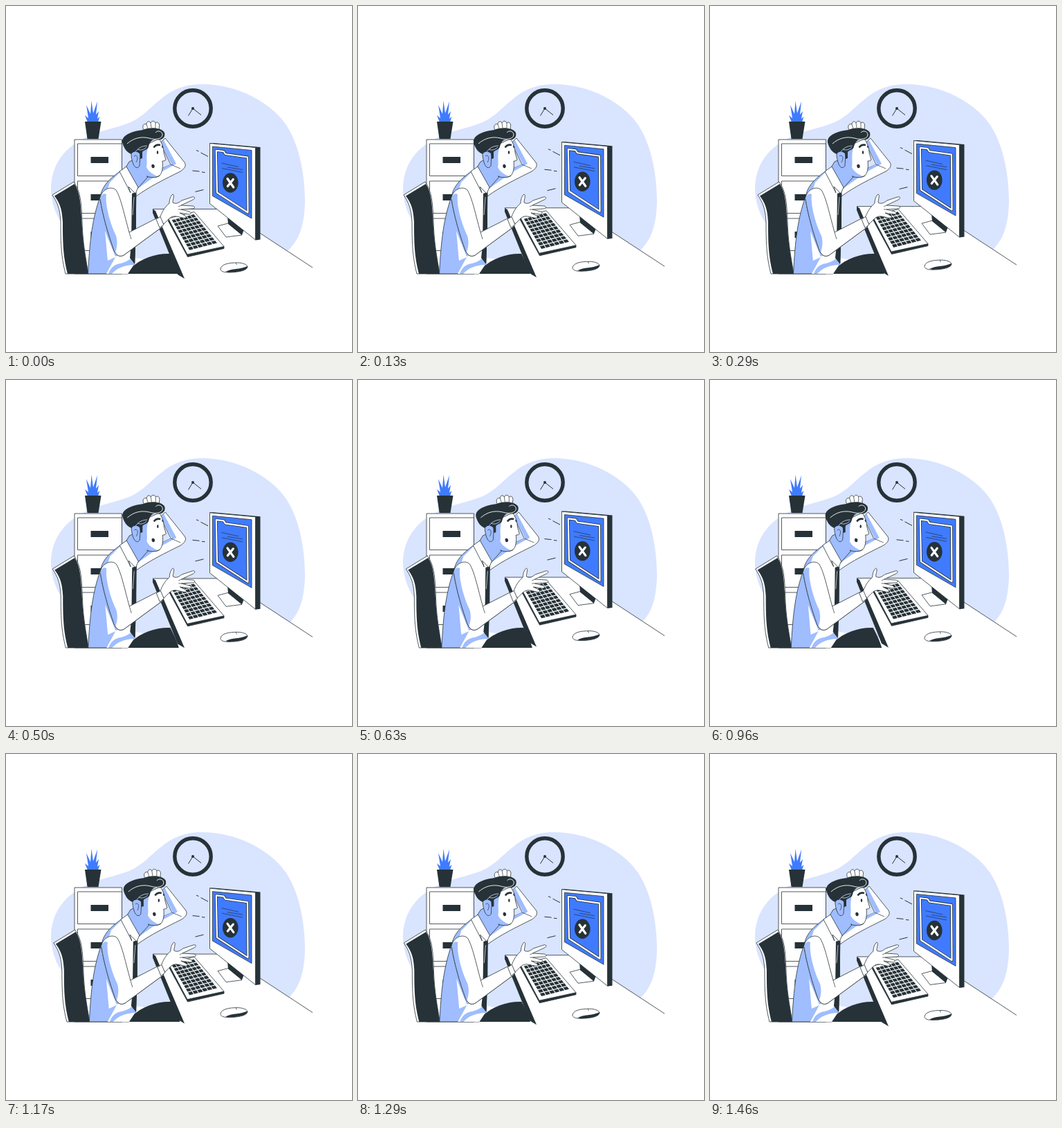
These frames come from a looping animation (500x500 px, 1500 ms). An HTML page with a canvas:

```html
<!DOCTYPE html>
<html lang="en">
<head>
<meta charset="utf-8">
<title>Computer trouble</title>
<style>
  html, body { margin: 0; width: 100%; height: 100%; overflow: hidden; background: #fff; }
  canvas { display: block; width: 500px; height: 500px; }
</style>
</head>
<body>
<canvas id="stage"></canvas>
<script>
const LOOP = 1500;
const DARK = '#263238', BLUE = '#407bff', SHADE = '#9fbdff', PALE = '#d9e4ff', WHITE = '#fff';
const canvas = document.getElementById('stage');
const ctx = canvas.getContext('2d');
const ratio = window.devicePixelRatio || 1;
canvas.width = canvas.height = 500 * ratio;

function shape(d, fill, stroke, width = 0.8) {
  const path = new Path2D(d);
  if (fill) {
    ctx.fillStyle = fill;
    ctx.fill(path);
  }
  if (stroke) {
    ctx.strokeStyle = stroke;
    ctx.lineWidth = width;
    ctx.stroke(path);
  }
}

const line = (d, color = DARK, width = 0.8) => shape(d, null, color, width);

function oval(x, y, rx, ry, fill, stroke, width = 0.8, turn = 0) {
  ctx.beginPath();
  ctx.ellipse(x, y, rx, ry, turn, 0, Math.PI * 2);
  if (fill) {
    ctx.fillStyle = fill;
    ctx.fill();
  }
  if (stroke) {
    ctx.strokeStyle = stroke;
    ctx.lineWidth = width;
    ctx.stroke();
  }
}

function drawRoom() {
  shape(`M65 265 C65 232 82 208 108 194 C130 180 155 178 178 169 C214 154 226 113 283 113
    C333 113 382 138 405 172 C426 204 432 250 432 283 C431 318 424 337 408 353
    C392 370 366 378 335 378 C270 379 200 366 150 358 C100 349 66 310 65 265Z`, PALE);

  oval(270, 148, 26.2, 26.2, PALE, DARK, 5.4);
  line('M270 148 L263.5 158.5 M270 148 L282 157.5', DARK, 1);
  oval(270, 148, 2, 2, DARK);

  shape('M99 193 H167.5 V387 H99Z', WHITE, DARK);
  for (const y of [199, 253, 307]) {
    shape(`M103.5 ${y} H167.5 V${y + 46.5} H103.5Z`, WHITE, DARK);
    shape(`M122.5 ${y + 19} H148 V${y + 28} H122.5Z`, DARK);
  }

  shape(`M118 168 L114 158 L119 162 L116 143 L122 156 L123.5 137 L126 155 L132 138
    L130 157 L134 152 L132 163 L135.5 160 L133 168Z`, BLUE);
  shape('M114 167 H137.5 L133.5 192 H117.5Z', DARK);
}

function drawKeyboard() {
  shape('M235 308 L262 359 L315 347.5 V350.5 L262.5 362.5 L234.5 311Z', DARK, DARK);
  shape('M234.5 307 L272 297.5 L315 347.5 L262 359Z', WHITE, DARK);
  const rows = 9, columns = 6;
  const spot = (u, v) => {
    const left = [239 + 26 * v, 309 + 44.5 * v];
    const right = [271.5 + 34.5 * v, 300.5 + 42.5 * v];
    return left.map((p, i) => (p + (right[i] - p) * u).toFixed(2)).join(' ');
  };
  let keys = '';
  for (let r = 0; r < rows; r++) {
    for (let c = 0; c < columns; c++) {
      const u0 = (c + 0.08) / columns, u1 = (c + 0.92) / columns;
      const v0 = (r + 0.1) / rows, v1 = (r + 0.88) / rows;
      keys += `M${spot(u0, v0)} L${spot(u1, v0)} L${spot(u1, v1)} L${spot(u0, v1)}Z`;
    }
  }
  shape(keys, DARK);
}

function drawMonitor() {
  shape('M306 318 L321 314 L341 331 L318 334Z', WHITE, DARK);
  shape('M320 304 L344 323 L341 331 L321 315Z', DARK);
  shape('M294 198 L300 198 L367.5 204 V337.5 L360.5 338.5 L356 300Z', DARK);
  shape('M294.5 198.5 L360.5 204.5 V338 L294.5 285.5Z', WHITE, DARK);
  shape('M298.5 203 L355 208.5 V307 L298.5 274.5Z', BLUE, DARK);

  const folder = 'M303.8 208.8 L314.5 210 L317 214 L349 218.5 L349.5 298.5 L305 269.5Z';
  line(folder, DARK, 3.8);
  line(folder, WHITE, 2.2);
  line('M311.5 227 L336 232.5 M312 234.5 L342 240.5 M320 233 L342 236.5', DARK, 0.7);
  oval(324.3, 255.5, 11.3, 14.2, DARK);
  ctx.lineCap = 'round';
  line('M320 249.5 L328.8 262 M328.3 250.5 L320.3 260.5', WHITE, 3.2);
  ctx.lineCap = 'butt';
}

function drawDesk() {
  shape('M212 293.5 H314 L443 378 L258 394Z', WHITE);
  line('M212 293.5 H314 L443 378');
  shape('M212 293.5 L216 296 L258 394 L248 388 L212 299Z', DARK);
  line('M275 208.5 L278.5 210 M281.5 212 L292 217.5 M269.5 238 L279.5 239 M283 240 L287.5 240.5 M273.5 268.5 L285.5 265.5', DARK, 1);
  drawKeyboard();
  drawMonitor();
  shape('M310 380 C311 373 322 371 334 371 C343 371 349 374 349 377 C348 383 333 385 321 385 C314 385 310 383 310 380Z', WHITE, DARK);
  shape('M317 384 C327 379 337 381 349 376 C350 382 335 385 322 385Z', DARK);
  line('M332 371 L333.5 374', DARK, 0.7);
}

function drawChair() {
  shape(`M67 273 L98 254 C108 268 109 285 110 312 C111 345 116 368 119 387 H86
    C80 363 79 346 79 312 C78 292 74 284 67 273Z`, WHITE, DARK);
  shape(`M70 274.5 L99 257 C107 269 108 286 109.5 312 C111 345 116 368 119 387 H89
    C83 363 82 346 82 312 C81 292 77 284 70 274.5Z`, DARK);
}

function drawFarArm() {
  shape('M187 259 L227 234 L238 229 L223 198 L230 191 L258 226 C261 231 258 235 252 239 C230 250 207 261 188 275Z', WHITE, DARK);
  shape('M187 258 L229 233 L239 228 L223 198 L228 194 L246 228 L224 240 L190 264Z', SHADE);
  line('M238 229 L252 235', DARK, 0.7);
}

function drawHead() {
  shape('M178 225 L172 235 L190 264 L205 247 L200 215Z', SHADE, DARK);
  shape(`M197 203 L221 192 C226 198 228 207 228 212 L231 222 C230 224 228 224 226 224
    C227 232 226 241 222 245 C216 249 207 247 201 242 L190 225Z`, WHITE, DARK);
  shape('M181 208 L206 202 C201 216 205 226 203 233 C207 241 214 244 219 246 C211 249 203 246 198 241 L183 234Z', SHADE);
  line('M203 246 C210 249 219 248 222 245');
  shape('M181 216 C180 209 190 208 194 214 L193 231 C189 237 183 233 181 216Z', SHADE, DARK);
  line('M185 217 C189 214 192 219 188 226', DARK, 0.7);

  oval(219, 211.5, 1.2, 2.5, DARK);
  line('M213.5 204.5 C216 201 219 200 223 201', DARK, 2.6);
  line('M225.5 202 L226.5 205', DARK, 1.5);
  oval(212.5, 231.5, 2.2, 2.7, DARK, null, 0, -0.2);

  shape(`M199 179 C196 174 199 169 203 171 C203 166 208 166 209 169 C211 165 215 166 216 169
    C220 166 223 171 221 176 L224 184 H202Z`, WHITE, DARK);
  line('M203 171 L205 177 M209 169 L210 176 M216 169 L216 177', DARK, 0.7);

  shape(`M168 197 C167 187 181 181 198 179 C208 174 226 176 229 183 C231 190 225 195 216 193
    C211 193 208 196 206 203 C205 208 199 208 197 211 L197 220 L194 221 L193 213
    C187 208 182 212 181 214 C174 211 170 205 168 197Z`, DARK);
  line('M175 199 C184 191 195 188 207 191 C216 194 226 192 226 186 C226 181 219 179 216 183', WHITE, 0.9);
  line('M187 211 C190 206 196 202 204 202 M190 207 C194 209 199 208 203 204', PALE, 0.8);
}

function drawTorso() {
  shape('M180 379 C195 364 219 357 237 358 C243 369 247 378 249.5 387 H165Z', DARK);
  shape('M166 238 C148 251 139 260 136 276 C125 306 121 338 118.5 387 H176 L186 372 L188 270 L174 238Z', SHADE, DARK);
  shape('M150 255 L166 239 L187 270 L184 330 L160 333 L143 278Z', WHITE);
  shape('M143 325 C145 345 146 359 147 368 L158 363 L145 387 H176 L186 372 L184 352 L158 362Z', WHITE);
  shape('M148 387 C151 378 157 373 166 372 C174 370 181 365 186 360 L185 374 C172 374 160 379 153 387Z', SHADE);
  shape('M182 271 L188 269 L188 324 L186 373 L179 364 L181 345Z', DARK);
  line('M185 276 L183 302', WHITE, 0.7);
}

function drawNearArm() {
  shape(`M136 279 C137 265 152 259 159 266 C166 277 171 302 178 327 L219 306 L226 319
    L173 358 C166 364 160 362 156 353 C148 331 140 304 136 279Z`, WHITE, DARK);
  shape('M136 279 C138 271 142 270 146 273 C146 295 154 318 163 334 L176 347 L222 317 L226 319 L173 358 C166 364 160 362 156 353 C148 331 140 304 136 279Z', WHITE);
  shape('M136 279 C138 272 141 270 145 272 C143 287 150 313 159 332 C162 342 160 350 158 356 C147 332 140 304 136 279Z', SHADE);
  line('M136 279 C140 304 148 331 156 353 C160 362 166 364 173 358 L226 319');
  line('M178 327 L181 337', DARK, 0.7);

  shape(`M222 307 C225 298 229 291 236 285 C236 280 238 274 241 272 C244 273 241 279 241 284
    C246 287 250 284 254 281 L269 276 C273 275 274 278 270 280 L253 288
    L270 289 C274 290 273 293 269 293 L253 294 L265 297 C269 299 267 301 264 301
    L251 299 L259 303 C262 306 259 307 255 306 C246 304 242 302 236 307 L228 315Z`, WHITE, DARK);
  line('M253 288 L249 290 M253 294 L249 294', DARK, 0.7);
  shape('M217 308 L223 304.5 L228 316 L222 320.5Z', WHITE, DARK);
}

function drawMan() {
  drawChair();
  drawFarArm();
  drawTorso();
  drawHead();
  shape('M164 239 L174 232 L191 262 L187 271 L177 261 L180 270Z', WHITE, DARK);
  drawNearArm();
}

// Cubic Bézier timing curve, solved for x by bisection.
function ease(x) {
  const bezier = (a, b, s) => 3 * (1 - s) ** 2 * s * a + 3 * (1 - s) * s * s * b + s ** 3;
  let low = 0, high = 1;
  for (let i = 0; i < 20; i++) {
    const mid = (low + high) / 2;
    if (bezier(0.36, 0.19, mid) < x) low = mid;
    else high = mid;
  }
  return bezier(0.07, 0.97, low);
}

const SHAKE = [0, -1, 2, -4, 4, -4, 4, -4, 2, -1, 0];

function shakeAt(phase) {
  const step = Math.floor(phase * 10);
  const from = SHAKE[step], to = SHAKE[step + 1];
  return from + (to - from) * ease(phase * 10 - step);
}

const floatAt = phase => -10 * (1 - Math.abs(1 - 2 * phase));

function shifted(x, y, draw) {
  ctx.save();
  ctx.translate(x, y);
  draw();
  ctx.restore();
}

const start = performance.now();

function render() {
  const phase = ((performance.now() - start) % LOOP) / LOOP;
  ctx.setTransform(ratio, 0, 0, ratio, 0, 0);
  ctx.lineJoin = 'round';
  ctx.fillStyle = WHITE;
  ctx.fillRect(0, 0, 500, 500);
  drawRoom();
  shifted(0, floatAt(phase), drawDesk);
  shifted(shakeAt(phase), 0, drawMan);
  requestAnimationFrame(render);
}

render();
</script>
</body>
</html>
```
